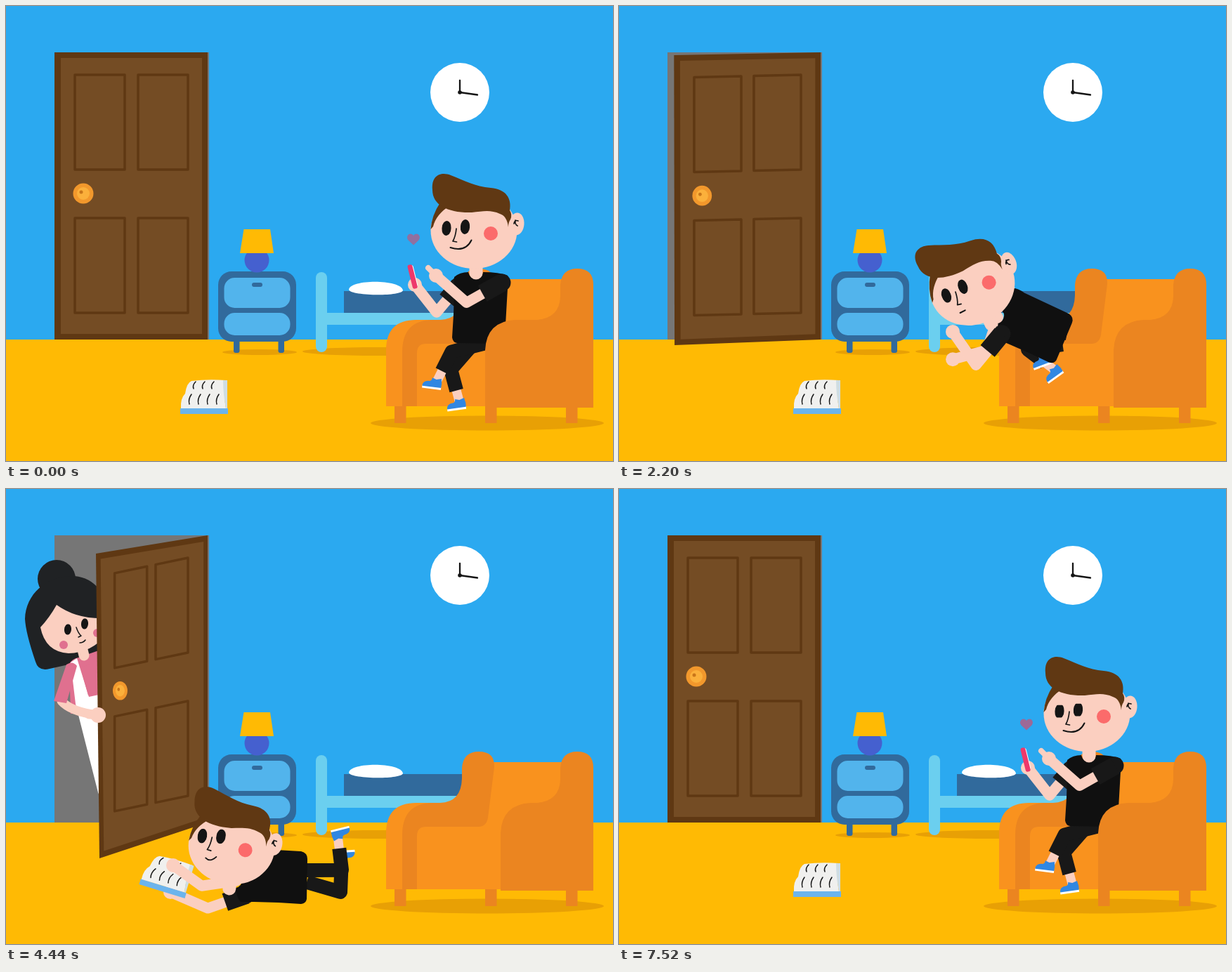
An HTML page with a canvas that plays this animation: 864x648 px, repeating every 7.56 s.

```html
<!DOCTYPE html>
<html lang="en">
<head>
<meta charset="utf-8">
<title>Caught on the phone</title>
<style>
html, body { margin: 0; width: 100%; height: 100%; overflow: hidden; }
canvas { display: block; width: 864px; height: 648px; }
</style>
</head>
<body>
<canvas id="stage" width="864" height="648"></canvas>
<script>
const ctx = document.getElementById('stage').getContext('2d');
const LOOP = 7560, CUT = 5160, TAU = Math.PI * 2, DEG = Math.PI / 180;
const C = {
  wall: '#2ba9f0', floor: '#ffba04', shade: '#e8a005', wood: '#744c24', trim: '#5f3813',
  navy: '#316a9c', sky: '#52b4ec', aqua: '#6bcfef', sofa: '#f9921e', sofaDark: '#eb8520',
  skin: '#fbcfc0', shirt: '#101010', sleeve: '#181818', hair: '#603813', ink: '#151515',
  cheek: '#fb6b6b', shoe: '#3087e2', pink: '#e0708f', bob: '#202224'
};

// drawing helpers
function fill(color, path) { ctx.fillStyle = color; ctx.fill(new Path2D(path)); }
function stroke(color, width, path, cap = 'round') {
  ctx.strokeStyle = color; ctx.lineWidth = width; ctx.lineCap = cap; ctx.lineJoin = 'round';
  ctx.stroke(new Path2D(path));
}
function oval(color, x, y, rx, ry = rx, turn = 0) {
  ctx.fillStyle = color; ctx.beginPath(); ctx.ellipse(x, y, rx, ry, turn, 0, TAU); ctx.fill();
}
function box(color, x, y, w, h, r = 0) {
  ctx.fillStyle = color; ctx.beginPath(); ctx.roundRect(x, y, w, h, r); ctx.fill();
}
function at(x, y, deg, draw, sx = 1, sy = 1) {
  ctx.save(); ctx.translate(x, y); ctx.rotate(deg * DEG); ctx.scale(sx, sy); draw(); ctx.restore();
}
const line = (...points) => 'M' + points.flat().join(' ');

// timing helpers
const clamp = u => Math.max(0, Math.min(1, u));
const lerp = (a, b, u) => a + (b - a) * u;
const mix = (a, b, u) => a.map((v, i) => lerp(v, b[i], u));
const smooth = u => u * u * (3 - 2 * u);
const easeIn = u => u * u;
const easeOut = u => u * (2 - u);
const ramp = (t, a, b) => smooth(clamp((t - a) / (b - a)));
const pulse = (t, mid, half) => clamp(1 - Math.abs(t - mid) / half);
const wave = (t, period) => Math.sin(Math.PI * t / period) ** 2;
const within = (t, a, b) => t > a && t < b;
const early = t => t < CUT;
const seated = t => t < 2080 || t >= CUT;

// poses: body x y turn, head turn and height, hands x y, feet x y turn; joints follow from these
const sit = {
  body: [668, 380, 0], head: [0, 1], hand: [612, 384], hold: [582, 397],
  footA: [612, 537, 7], footB: [646, 566, -8]
};
const tilt = { ...sit, head: [-8, 1], hand: [602, 368] };
const squash = {
  ...tilt, body: [671, 387, 0], head: [-8, .9], hand: [600, 381], hold: [571, 419],
  footA: [614, 541, 12]
};
const perk = { ...sit, head: [5, 1.04] };
const crouch = { ...squash, body: [662, 394, -10], head: [-14, .92] };
const fly = {
  body: [541, 442, -68], head: [-24, 1], hand: [477, 463], hold: [477, 503],
  footA: [607, 504, -22], footB: [623, 520, -37]
};
const slide = {
  body: [346, 558, -90], head: [-14, 1], hand: [236, 571], hold: [247, 538],
  footA: [428, 463, 111], footB: [464, 485, 125]
};
const lie = {
  body: [328, 558, -90], head: [6, 1], hand: [234, 574], hold: [238, 536],
  footA: [472, 493, 166], footB: [478, 524, 176]
};
const keys = [
  [80, sit], [560, tilt], [780, tilt], [920, squash], [1080, perk], [1720, perk],
  [1960, crouch], [2200, fly, easeIn], [2440, slide, easeOut], [2600, slide], [2920, lie],
  [CUT, lie], [CUT, sit], [5600, tilt], [6680, tilt], [7200, sit]
];
function poseAt(t) {
  const next = keys.findIndex(k => k[0] > t);
  if (next < 1) return { ...sit };
  const [t0, a] = keys[next - 1], [t1, b, ease = smooth] = keys[next], pose = {};
  for (const part in a) pose[part] = mix(a[part], b[part], ease((t - t0) / (t1 - t0)));
  if (within(t, 5920, 6640)) pose.hand = mix(tilt.hand, sit.hand, wave(t - 5920, 360));
  return pose;
}

// middle joint of a two-part limb
function joint([ax, ay], [bx, by], len, side) {
  const dx = bx - ax, dy = by - ay, d = Math.hypot(dx, dy) || 1;
  const h = side * Math.sqrt(Math.max(0, len * len - d * d / 4)) / d;
  return [(ax + bx) / 2 - dy * h, (ay + by) / 2 + dx * h];
}

function room() {
  box(C.wall, 0, 0, 864, 475);
  box(C.floor, 0, 475, 864, 173);
  oval('#fff', 646, 123, 42);
  stroke(C.ink, 2.3, 'M646 106V123L671 126.5');
  oval(C.ink, 646, 123, 2.8);

  oval(C.shade, 361, 493, 53, 4);
  oval(C.shade, 530, 492, 108, 6);
  for (const x of [324, 387.5]) box(C.navy, x, 470, 8.5, 24, 3);
  box(C.navy, 302, 378, 111, 100, 19);
  box(C.sky, 310.5, 387, 94, 43, 15);
  box(C.sky, 310.5, 437, 94, 32, 15);
  box(C.navy, 350, 394, 15, 6, 3);
  oval('#4560cf', 357, 362, 17.5);
  fill(C.floor, 'M338.5 318H376L381 352H333Z');

  box(C.navy, 481, 406, 190, 32);
  fill('#fff', 'M488 404C490 389 562 389 565 405C563 414 490 413 488 404Z');
  box(C.aqua, 448, 437, 215, 17);
  box(C.aqua, 441, 379, 16, 114, 8);
}

function sofaBack() {
  oval(C.shade, 685, 594, 166, 10.5);
  for (const x of [553, 682, 797]) box(C.sofaDark, x, 565, 16.5, 29);
  fill(C.sofa, 'M541 570V490Q541 447 584 447H660L692 389H810V570Z');
  fill(C.sofaDark, 'M564 570V493Q564 447 608 447H618Q648 446 649 412V397Q651 374 673 374Q696 374 695 396L686 468Q684 481 672 481H598Q585 481 585 494V570Z');
}
function sofaArm(x) {
  fill(C.sofaDark, `M${x} 572V490Q${x + 2} 449 ${x + 43} 447H756Q788 444 789 414V397Q791 374 813 374Q836 374 836 397V572Z`);
}

function door(t) {
  const p = early(t) ? ramp(t, 2000, 2800) : 0;
  const leaf = (x, y) => {
    const out = p * (287 - x) / 218, down = (y - 66) / 409;
    return [x + out * (59 + 5 * down), y + out * (26 + 25 * down)];
  };
  const inlay = (x, y) => {
    const out = p * (259 - x) / 162;
    return [x + out * 57, y + out * 22];
  };
  const quad = (map, x, y, w, h) =>
    line(map(x, y), map(x + w, y), map(x + w, y + h), map(x, y + h)) + 'Z';
  fill(C.trim, quad(leaf, 69, 66, 218, 409));
  fill(C.wood, quad(leaf, 78, 74, 201, 393));
  for (const x of [98, 188]) for (const y of [98, 302]) stroke(C.trim, 3.5, quad(inlay, x, y, 71, 135));
  at(...inlay(110, 267), 0, () => {
    oval('#f2982c', 0, 0, 14.5);
    oval('#fbb03b', 0, 0, 9);
    const turn = within(t, 700, 1580) ? 75 * wave(t - 700, 440) : 0;
    at(0, 0, turn, () => oval('#c9761a', -3, -2, 2.5));
  }, 1 - .28 * p, 1 - .08 * p);
}

function woman(t, handOnly) {
  at(130, 330, 26 * (1 - ramp(t, 2360, 2735)), () => {
    ctx.translate(-130, -330);
    if (handOnly) {
      stroke(C.skin, 13, 'M118 321H130');
      oval(C.skin, 131, 322, 11);
      return;
    }
    oval(C.bob, 72, 128, 27);
    fill(C.bob, 'M42 246Q28 205 27 185C28 148 60 122 98 124Q140 128 152 190V236L62 256Q46 260 42 246Z');
    fill(C.skin, 'M72 165Q62 183 49 197Q56 232 89 234Q122 233 142 208V184Q101 186 72 165Z');
    fill(C.pink, 'M90 249Q94 242 103 240L132 230L150 320H92Z');
    fill('#fff', 'M92 247L101 241L118 296L146 290V470L131 432L99 306Z');
    fill(C.pink, 'M106 254L118 250L146 262V286L117 294Z');
    stroke(C.skin, 15, 'M108 225L111 237');
    stroke(C.skin, 13, 'M79 302Q92 317 130 322');
    fill(C.pink, 'M86 250Q95 244 101 252L86 305L68 302Z');
    const lid = pulse(t, 2650, 100);
    eye(88, 200, 5, 7.7, lid);
    eye(112, 192, 5, 7.7, lid);
    oval(C.pink, 82, 222, 6);
    oval(C.pink, 130, 205, 6);
    stroke(C.ink, 1.5, 'M100 197Q103 206 107 209L103 211');
    const talk = within(t, 3080, 3840) ? wave(t - 3080, 220) : 0;
    if (talk > .15) oval(C.ink, 109, 217, 3.5, 3.5 * talk);
    else stroke(C.ink, 1.5, 'M105 219Q110 219 113 215');
  });
}

function eye(x, y, rx, ry, lid) {
  ctx.save();
  ctx.beginPath(); ctx.rect(x - rx, y - ry * (1 - .9 * lid), rx * 2, ry * (2 - 1.6 * lid)); ctx.clip();
  oval(C.ink, x, y, rx, ry, .08);
  ctx.restore();
}

function book(t) {
  const u = early(t) ? ramp(t, 2400, 2560) : 0, back = early(t) ? 5 * ramp(t, 2600, 2920) : 0;
  at(282 - 48 * u - back, 557 - 7 * u, 17 * u, () => {
    fill('#6cb4ec', 'M-34 16H34V24H-34Z');
    fill('#f0f0ee', 'M-33 16Q-34 2 -27 -5Q-25 -20 -18 -23Q5 -26 31 -24Q27 -5 31 16Z');
    fill('#cfdde2', 'M27 -24H33V16H31Q27 -4 27 -24Z');
    const mark = (x, y, h) => stroke(C.ink, 1.5, `M${x + 3} ${y - h}Q${x - 2} ${y} ${x} ${y + h}`);
    for (let i = 0; i < 3; i++) mark(-15 + i * 13, -17, 5);
    for (let i = 0; i < 4; i++) mark(-21 + i * 13, 3, 7);
  });
}

function phone(x, y, turn) {
  at(x, y, turn, () => {
    box('#fff', -1, -28, 5, 31, 2);
    box('#ee386b', -4, -29.5, 7, 35, 3);
  });
}

function arm(shoulder, hand, len, cover, point) {
  const elbow = joint(shoulder, hand, len, -1), [x, y] = hand;
  stroke(C.skin, 15, line(shoulder, elbow, hand));
  oval(C.skin, x, y, 10);
  if (point > 0) stroke(C.skin, 8, line(hand, [x - 11 * point, y - 11 * point]));
  if (cover <= 0) return;
  oval(C.sleeve, ...shoulder, 12.5 * cover);
  stroke(C.sleeve, 26 * cover, line(shoulder, mix(shoulder, elbow, .55)), 'butt');
}

function leg(hip, [x, y, turn]) {
  const ankle = [x, y], knee = joint(hip, ankle, 50, 1), cuff = mix(knee, ankle, .62);
  stroke(C.skin, 13, line(cuff, ankle));
  stroke(C.sleeve, 20, line(hip, knee, cuff), 'butt');
  at(x, y, turn, () => {
    fill('#fff', 'M-19 5H8V9H-19Z');
    fill(C.shoe, 'M-6 -7L0 -5L7 -7Q9 0 8 6H-19Q-19 -2 -9 -2Q-6 -3 -6 -7Z');
  });
}

function mouth(t) {
  if (t < 1000 || t >= CUT) return stroke(C.ink, 2, 'M632.5 344Q654 351 662.5 333.5');
  const u = clamp((t - 4280) / 160);
  if (t < 2760) stroke(C.ink, 2, 'M635 347L643 346.5');
  else if (u < .5) oval(C.ink, 637, 349, 3.6 * (1 - u));
  else stroke(C.ink, 1.8, `M635 347Q642 ${347 + 6 * u} 650 344`);
}

function head([x, y], [turn, height], t) {
  at(x, y, turn, () => {
    ctx.translate(-668, -378);
    stroke(C.skin, 19, 'M669 362V380');
    oval(C.skin, 666, 320, 61.5, 54);
    oval(C.skin, 727, 310.5, 10.5, 16, .08);
    stroke(C.ink, 1.7, 'M723 310Q724 304 729 306M725 305Q724 311 728 313');
    fill(C.hair, 'M604.5 318Q606 298 618 280L632 284Q612 297 608 314Z');
    fill(C.hair, 'M607 262C605 240 620 236 633 241C654 249 667 257 690 259C712 261 720 274 717 291Q721 297 718 304Q715 308 715 315Q713 299 703 296C690 290 680 292 663 294C630 295 607 284 607 262Z');
    const up = early(t) ? ramp(t, 2640, 2920) : 0;
    ctx.translate(-4 * up, -7 * up);
    const lid = Math.max(...[970, 5720, 7440].map(mid => pulse(t, mid, 100)));
    eye(627, 316.5, 6.7, 10.5, lid);
    eye(653.5, 314.5, 6.7, 10.5, lid);
    stroke(C.ink, 1.7, 'M641 317Q640 328 636 335L641.5 336');
    mouth(t);
    oval(C.cheek, 690, 324 + 6 * up, 10);
  }, 1.45 - .45 * height, height);
}

function boy(t) {
  const p = poseAt(t), resting = t >= 2400 && early(t);
  const [x, y, turn] = p.body, flat = clamp(-turn / 60);
  const s = Math.sin(turn * DEG), c = Math.cos(turn * DEG);
  const onBody = (a, b) => [x + a * c - b * s, y + a * s + b * c];
  const kick = within(t, 3080, 3740) ? Math.sin(Math.PI * (t - 3080) / 220) : 0;
  const tap = seated(t) ? 9 * wave(t, 376) : 0;

  const nearArm = () => arm(onBody(lerp(38, -20, flat), 14), p.hand, 58, 1, 1 - flat);
  if (resting) { nearArm(); book(t); }
  arm(onBody(lerp(-23, 0, flat), 18 * (1 - flat)), p.hold, 50, 1 - flat, 0);
  if (t < 1640 || t >= CUT) phone(...p.hold, -14 - .7 * (p.hold[1] - 397));
  leg(onBody(-2, 100), mix(p.footB, [p.footB[0] + 5, p.footB[1], p.footB[2] + 12], -kick));
  leg(onBody(15, 100), mix(p.footA, [p.footA[0] + 5, p.footA[1], p.footA[2] + 12], kick + tap / 12 * seated(t)));
  at(x, y, turn, () => fill(C.shirt,
    'M-30 6Q-22 -1 -10 -1Q-8 8 1 8Q10 8 11 -1Q34 -1 46 4Q49 10 46 22L42 92Q40 101 31 101L-26 100Q-32 99 -33 92L-31 60L-30 25Z'));
  head([x - 11 * flat, y - 2 + 11 * flat], p.head, t);
  if (!resting) nearArm();
}

function heart(t) {
  const age = (t - 7240 + LOOP) % LOOP;
  if (age > 640) return;
  const s = clamp(age / 120);
  ctx.globalAlpha = (1 - age / 640) * 1.08 * s;
  at(580, 356 - age * .075, 0, () => fill('#e83f5c',
    'M0 8.5L-7.5 1.5C-12 -4 -5 -11 0 -5C5 -11 12 -4 7.5 1.5Z'), s, s);
  ctx.globalAlpha = 1;
}

function draw(t) {
  room();
  box('#767676', 69, 66, 220, 409);
  const visitor = within(t, 2360, CUT);
  if (visitor) woman(t, false);
  door(t);
  if (visitor && t > 2680) woman(t, true);
  sofaBack();
  if (!seated(t)) sofaArm(704);
  if (t < 2400 || t >= CUT) book(t);
  boy(t);
  if (seated(t)) sofaArm(682);
  heart(t);
  if (within(t, 1640, 2080)) {
    const u = (t - 1640) / 400;
    phone(lerp(582, 900, u), 397 - 420 * u * (1 - u), -14 + 540 * u);
  }
}

const start = performance.now();
function tick() {
  draw((performance.now() - start) % LOOP);
  requestAnimationFrame(tick);
}
draw(0);
requestAnimationFrame(tick);
</script>
</body>
</html>
```
